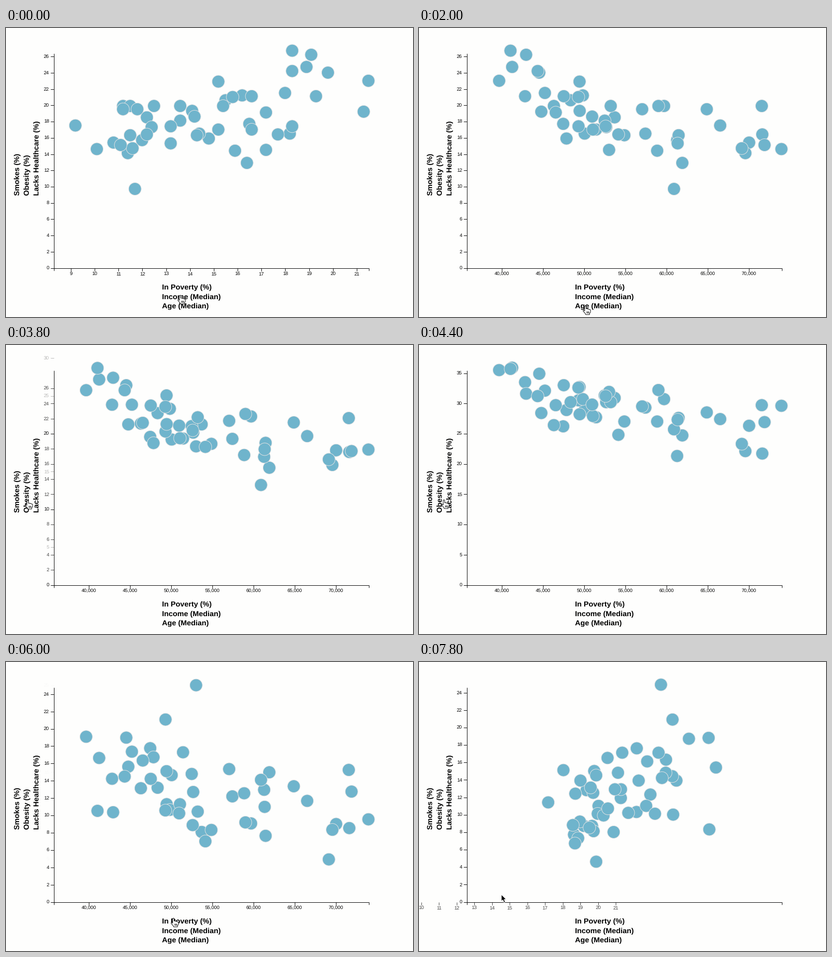
Recreate the animation shown at these times as a matplotlib script. Size 840 by 599 pixels, loop 8000 ms.

```python
import numpy as np
import matplotlib.pyplot as plt
from matplotlib.animation import FuncAnimation
from matplotlib.patches import Polygon

W, H, DPI = 840, 599, 100
PX = 72 / DPI                     # points per pixel
FRAMES, STEP = 40, 200
X0, Y0, PLOT_W, PLOT_H = 98, 497, 650, 450
RADIUS, EASE_MS = 13, 1000

plt.rcParams["font.family"] = "Liberation Sans"
plt.rcParams["text.hinting"] = "none"

# One value per state, in alphabetical order of the states
POVERTY = [19.3, 11.2, 18.2, 18.9, 16.4, 12, 10.8, 12.5, 17.7, 16.5, 18.3, 11.4, 14.8,
           14.4, 15.2, 12.2, 13.6, 19.1, 19.8, 14.1, 10.1, 11.6, 16.2, 11.5, 21.5, 15.5,
           15.4, 12.4, 15.2, 9.2, 11.1, 21.3, 15.9, 17.2, 11.5, 15.8, 16.6, 16.6, 13.6,
           14.3, 18, 14.2, 18.3, 17.2, 11.7, 12.2, 11.8, 13.2, 18.3, 13.2, 11.2]
INCOME = [42830, 71583, 50068, 41262, 61933, 61303, 70048, 59716, 71648, 47463, 49321,
          69592, 47861, 57444, 49446, 53712, 52504, 42958, 44555, 49462, 73971, 69160,
          49847, 61481, 39680, 48363, 46328, 52686, 51450, 66532, 71919, 44803, 58878,
          46556, 59029, 49308, 47529, 51075, 53234, 54891, 45238, 50979, 44361, 53035,
          60922, 54166, 64902, 61366, 41059, 52622, 57055]
SMOKES = [21.1, 19.9, 16.5, 24.7, 12.9, 15.7, 15.4, 19.9, 16.4, 17.7, 17.4, 14.1, 15.9,
          16.5, 22.9, 18.5, 18.1, 26.2, 24, 19.3, 14.6, 14.7, 21.2, 16.3, 23, 20.6,
          19.9, 17.3, 17, 17.5, 15.1, 19.2, 14.4, 19.1, 19.9, 21, 21.1, 17, 19.9,
          16.3, 21.5, 18.6, 24.2, 14.5, 9.7, 16.4, 19.5, 15.3, 26.7, 17.4, 19.5]
OBESITY = [33.5, 29.7, 28.9, 35.9, 24.7, 21.3, 26.3, 30.7, 21.7, 26.2, 30.5, 22.1, 28.9,
           29.3, 32.7, 30.9, 31.3, 31.6, 34.9, 28.2, 29.6, 23.3, 30.7, 27.6, 35.5, 30.2,
           26.4, 30.2, 27.7, 27.4, 26.9, 28.4, 27, 29.7, 32.2, 32.6, 33, 27.9, 30.2,
           27, 32.1, 29.8, 31.2, 31.9, 25.7, 24.8, 28.5, 27.3, 35.7, 31.2, 29.5]
UNINSURED = [13.9, 15, 14.4, 16.3, 14.8, 12.8, 8.7, 8.7, 8.3, 17.6, 20.9, 8.1, 16.5,
             11.9, 14.8, 7.7, 14.5, 10, 18.7, 11, 9.2, 4.6, 10.3, 7.3, 18.8, 12.9,
             12.9, 12.4, 17.1, 11.4, 12.5, 15.4, 12.3, 16.1, 8.8, 10.2, 13.9, 11, 10.1,
             8, 17.1, 9.9, 14.2, 24.9, 13.9, 6.7, 13.1, 10.7, 10.1, 8.5, 15.1]


class Measure:
    """A data column with its scale and tick values."""

    def __init__(self, data, ticks, horizontal):
        self.data = np.array(data, float)
        self.ticks = set(ticks)
        self.horizontal = horizontal
        self.low = 0.9 * self.data.min() if horizontal else 0
        self.high = self.data.max()

    def pos(self, v):
        part = (v - self.low) / (self.high - self.low)
        return X0 + PLOT_W * part if self.horizontal else Y0 - PLOT_H * part


poverty = Measure(POVERTY, range(9, 22), True)
income = Measure(INCOME, range(40000, 70001, 5000), True)
smokes = Measure(SMOKES, range(0, 27, 2), False)
obesity = Measure(OBESITY, range(0, 36, 5), False)
uninsured = Measure(UNINSURED, range(0, 25, 2), False)

# (start in ms, from, to)
X_MOVES = [(475, poverty, income), (7201, income, poverty)]
Y_MOVES = [(3391, smokes, obesity), (5178, obesity, uninsured)]

# Pointer path: time, x, y of the tip
PATH = np.array([
    (0, 359, 554), (1200, 359, 554), (1800, 343, 576), (2100, 343, 576),
    (2400, 23, 561), (2800, 19, 430), (3200, 42, 324), (3600, 43, 322),
    (3800, 44, 322), (4400, 51, 321), (5000, 58, 322), (5200, 58, 322),
    (5500, 26, 400), (6000, 345, 531), (6400, 345, 533), (7200, 345, 532),
    (7400, 345, 531), (7800, 170, 482)])

HAND = np.array([
    (-1, 1), (0, 0), (1, 0), (2, 1), (2, 6), (4, 5.5), (5, 6.5), (7, 6.2), (8, 7.5),
    (10, 7.5), (11, 9), (11, 13), (9, 15.5), (9, 18), (1, 18), (0, 15.5), (-4, 11),
    (-4, 9), (-2.5, 9), (-1, 10.5)])
ARROW = np.array([(0, 0), (0, 14), (3, 11), (5.5, 16.5), (8, 15.5), (5.7, 10), (10, 10)])


def cubic(t):
    t = min(max(t, 0), 1)
    return 4 * t ** 3 if t < 0.5 else 1 - (2 - 2 * t) ** 3 / 2


def current(moves, ms):
    """The measures an axis is between, and the eased progress."""
    start, a, b = next((m for m in reversed(moves) if ms >= m[0]), moves[0])
    return a, b, cubic((ms - start) / EASE_MS)


def lerp(a, b, e):
    return a + (b - a) * e


fig = plt.figure(figsize=(W / DPI, H / DPI), dpi=DPI, facecolor="#fefefd")
ax = fig.add_axes([0, 0, 1, 1])
ax.set_xlim(0, W)
ax.set_ylim(H, 0)
ax.axis("off")


def line(xs, ys, **kw):
    return ax.plot(xs, ys, color="black", lw=PX, solid_capstyle="butt", **kw)[0]


def label(x, y, s, size, **kw):
    return ax.text(x, y, s, fontsize=size * PX, va="baseline", color="black", **kw)


line([X0 + .5, X0 + .5, X0 + PLOT_W + .5, X0 + PLOT_W + .5],
     [Y0 + 6, Y0 + .5, Y0 + .5, Y0 + 6], zorder=1)
line([X0 + .5, X0 + .5], [53, Y0 + .5], zorder=1)


def make_ticks(moves, align):
    values = sorted(set().union(*(a.ticks | b.ticks for _, a, b in moves)))
    return {v: (line([0, 0], [0, 0], zorder=1),
                label(0, 0, f"{v:,}", 10, ha=align, zorder=1)) for v in values}


x_ticks = make_ticks(X_MOVES, "center")
y_ticks = make_ticks(Y_MOVES, "right")

dots = ax.scatter(np.zeros(len(POVERTY)), np.zeros(len(POVERTY)),
                  s=np.full(len(POVERTY), (2 * RADIUS * PX) ** 2),
                  facecolor="#6fb4cc", edgecolor="#e3e3e3", linewidth=PX, zorder=2)

for i, s in enumerate(["In Poverty (%)", "Income (Median)", "Age (Median)"]):
    label(322, 542 + 20 * i, s, 15.4, weight="bold", zorder=3)
for i, s in enumerate(["Smokes (%)", "Obesity (%)", "Lacks Healthcare (%)"]):
    label(28 + 20 * i, 347, s, 15.4, weight="bold", rotation=90,
          rotation_mode="anchor", zorder=3)

pointer = ax.add_patch(Polygon(HAND, lw=PX, zorder=5))
knuckles = [line([0, 0], [0, 0], zorder=6) for _ in range(3)]


def place_ticks(ticks, a, b, e):
    for v, (mark, text) in ticks.items():
        p = lerp(a.pos(v), b.pos(v), e) + .5
        alpha = (v in a.ticks) * (1 - e) + (v in b.ticks) * e
        shown = alpha > 0.004 and -40 < p < W + 40
        mark.set_visible(shown)
        text.set_visible(shown)
        if not shown:
            continue
        if a.horizontal:
            mark.set_data([p, p], [Y0 + .5, Y0 + 6.5])
            text.set_position((p, Y0 + 16.1))
        else:
            mark.set_data([X0 - 6, X0 + .5], [p, p])
            text.set_position((X0 - 9, p + 3.2))
        mark.set_alpha(min(alpha, 1))
        text.set_alpha(min(alpha, 1))


def place_pointer(ms):
    x = np.interp(ms, PATH[:, 0], PATH[:, 1])
    y = np.interp(ms, PATH[:, 0], PATH[:, 2])
    on_text = (322 < x < 445 and 527 < y < 586) or (14 < x < 73 and 192 < y < 348)
    pointer.set_xy((HAND if on_text else ARROW) + (x, y))
    pointer.set_facecolor("white" if on_text else "black")
    pointer.set_edgecolor("black" if on_text else "white")
    for i, k in enumerate(knuckles):
        kx = x + 2.5 + 2.3 * i
        k.set_data([kx, kx], [y + 10.5, y + 14.5])
        k.set_visible(on_text)


def draw(i):
    ms = i * STEP
    xa, xb, xe = current(X_MOVES, ms)
    ya, yb, ye = current(Y_MOVES, ms)
    place_ticks(x_ticks, xa, xb, xe)
    place_ticks(y_ticks, ya, yb, ye)
    dots.set_offsets(np.column_stack([
        lerp(xa.pos(xa.data), xb.pos(xb.data), xe),
        lerp(ya.pos(ya.data), yb.pos(yb.data), ye)]))
    place_pointer(ms)
    return []


anim = FuncAnimation(fig, draw, frames=FRAMES, interval=STEP, repeat=True,
                     repeat_delay=0, blit=False)
plt.show()
```
